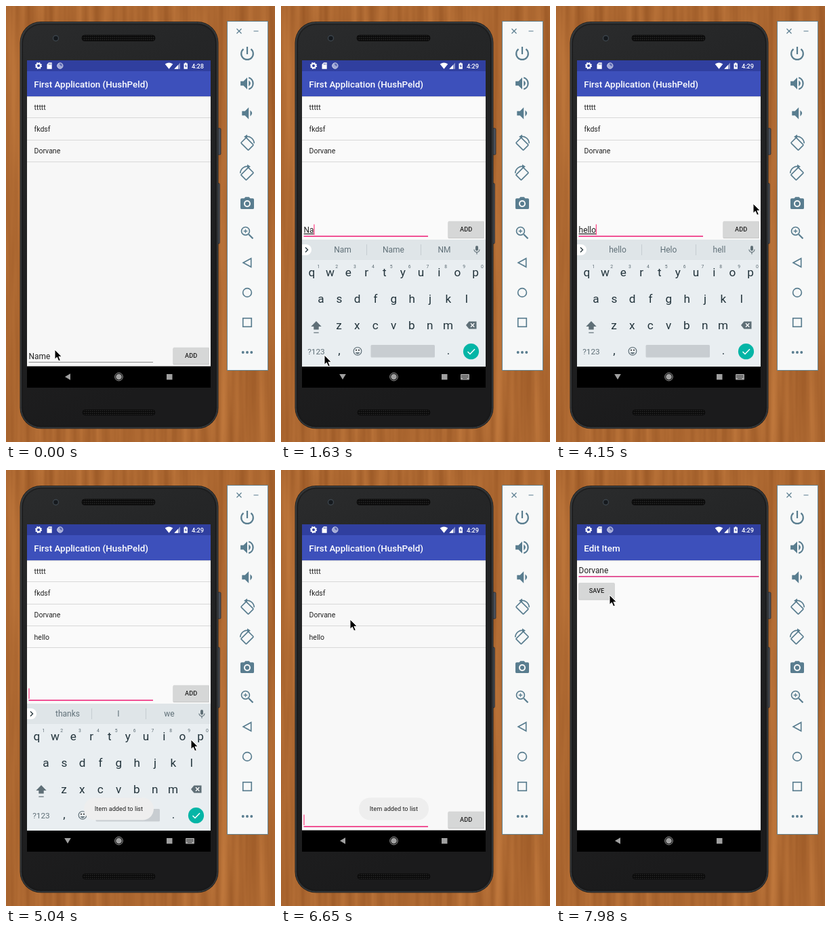
Write an HTML page that moves like this. It is 397 by 642 pixels and loops after 8 s.

```html
<!DOCTYPE html>
<html lang="en">
<head>
<meta charset="utf-8">
<title>List app demo</title>
<style>
  html, body { margin: 0; width: 100%; height: 100%; overflow: hidden; background: #ac6730; }
  svg { display: block; width: 397px; height: 642px; }
  text { font-family: Roboto, sans-serif; fill: #212121; white-space: pre; }
  .title { font-size: 13.4px; font-weight: 500; fill: #fff; }
  .item { font-size: 10.55px; }
  .field { font-size: 11.86px; }
  .label { font-size: 9.23px; font-weight: 500; text-anchor: middle; }
  .key { font-size: 17.2px; fill: #22333b; text-anchor: middle; }
  .hint { font-size: 6.8px; fill: #5c6b73; text-anchor: middle; }
  .word { font-size: 12px; fill: #607078; text-anchor: middle; }
  .line { fill: none; stroke: currentColor; stroke-width: 2; }
  .thin { stroke-width: 1.5; }
  .fine { stroke-width: 1.2; }
  .solid { fill: currentColor; }
</style>
</head>
<body>
<svg viewBox="0 0 397 642">
  <defs>
    <filter id="wood" x="0" y="0" width="1" height="1" color-interpolation-filters="sRGB">
      <feTurbulence type="fractalNoise" baseFrequency=".07 .003" numOctaves="3" seed="8"/>
      <feColorMatrix values=".2 0 0 0 .575  .17 0 0 0 .32  .12 0 0 0 .13  0 0 0 0 1"/>
    </filter>
    <linearGradient id="body" x2=".25" y2="1">
      <stop offset="0" stop-color="#2b2c2d"/><stop offset=".25" stop-color="#252627"/><stop offset="1" stop-color="#1b1b1c"/>
    </linearGradient>
    <linearGradient id="shade" x2="0" y2="1">
      <stop stop-opacity=".14"/><stop offset="1" stop-opacity="0"/>
    </linearGradient>
    <pattern id="mesh" width="3" height="3" patternUnits="userSpaceOnUse">
      <rect width="3" height="3" fill="#0b0b0b"/><circle cx="1.5" cy="1.5" r=".8" fill="#2c2c2c"/>
    </pattern>
    <clipPath id="screen"><rect x="31" y="80" width="271" height="482"/></clipPath>
  </defs>

  <rect width="397" height="642" filter="url(#wood)"/>

  <!-- phone -->
  <g fill="#4a505a" stroke="#25282c" stroke-width=".7">
    <rect x="311" y="180" width="6" height="39" rx="1.5"/>
    <rect x="311" y="261" width="4.4" height="89" rx="1.5"/>
  </g>
  <rect x="20.5" y="23" width="293" height="599.5" rx="31" fill="#1c1e1f"/>
  <rect x="22" y="24.5" width="290" height="596.5" rx="29.5" fill="url(#body)" stroke="#44494c"/>
  <rect x="24.5" y="27" width="285" height="591.5" rx="27.5" fill="none" stroke="#171819"/>
  <rect x="112" y="43" width="108" height="8.5" rx="4" fill="url(#mesh)" stroke="#0c0c0c"/>
  <rect x="113" y="594.5" width="107" height="8" rx="4" fill="url(#mesh)" stroke="#0c0c0c"/>
  <circle cx="73.5" cy="47.5" r="4" fill="#15191d" stroke="#3b434a" stroke-width="1.5"/>

  <g clip-path="url(#screen)">
    <g id="listPage">
      <rect id="page" x="31" y="80" width="271" height="451"/>
      <rect id="pressed" x="31" y="197.5" width="271" height="32" fill="#dedede"/>
      <g id="rows"></g>
      <g id="entry">
        <text id="typed" class="field" x="33.6" y="520"></text>
        <rect id="rule" x="33.5" width="183.5"/>
        <rect id="caret" y="507.5" width="1.2" height="15.5" fill="#ff4081"/>
        <g id="add"></g>
      </g>
    </g>
    <g id="editPage">
      <rect x="31" y="80" width="271" height="451" fill="#fafafa"/>
      <text class="field" x="33.6" y="152">Dorvane</text>
      <rect x="33.5" y="156" width="266" height="1.7" fill="#e0408a"/>
      <rect id="editCaret" x="33.4" y="139.5" width="1.2" height="15.5" fill="#ff4081"/>
      <g id="save"></g>
    </g>

    <!-- status bar -->
    <g fill="#fff">
      <circle cx="48" cy="88" r="3.1" fill="none" stroke="#fff" stroke-width="2.2"/>
      <circle cx="48" cy="88" r="4.4" fill="none" stroke="#fff" stroke-width="1.3" stroke-dasharray="1.9 1.56"/>
      <path d="M60.5 86l2.5-2.7h4.7v9.4h-7.2z"/>
      <path d="M63.2 84.6v2M64.7 84.6v2M66.2 84.6v2" stroke="#303f9f" stroke-width=".7"/>
      <circle cx="79.8" cy="88" r="4.2" fill="#a3aad6" stroke="#c4c9e6"/>
      <path d="M79 84.5a3.5 3.5 0 0 1 4 4a4 4 0 0 1-4-4" fill="#5c69b5"/>
      <path d="M234.7 85.6q5.8-4.4 11.6 0l-5.8 7.2z"/>
      <path d="M257 83.6v9.2h-8.7z" opacity=".45"/>
      <path d="M254 86.8v6h-5.7z"/>
      <path d="M262.5 84.4h1.5v-1h2.4v1h1.5v8.4h-5.4z"/>
      <path d="M265.5 85.6l-1.6 3.2h1.2v2.5l1.6-3.3h-1.2z" fill="#303f9f"/>
    </g>
    <text id="clock" class="label" x="283" y="91.6" style="fill:#fff"></text>

    <rect x="31" y="530.5" width="271" height="32"/>
    <g id="keyboard">
      <rect x="31" y="344" width="271" height="187" fill="#e9eef1"/>
      <rect x="31" y="344" width="271" height="30" fill="#dfe5e8"/>
      <path d="M31 351h6a8 8 0 0 1 0 16h-6z" fill="#fff"/>
      <path d="M36 355.5l3.5 3.5l-3.5 3.5" fill="none" stroke="#26363d" stroke-width="1.4"/>
      <path d="M126.5 351v16M206.5 351v16" stroke="#c6cdd1"/>
      <g id="words"></g>
      <g id="keys"></g>
      <g color="#5f6f77">
        <rect x="287" y="353" width="4" height="7.5" rx="2" class="solid"/>
        <path d="M285 358.5a4 4 0 0 0 8 0M289 362.5v3" class="line fine"/>
        <path d="M52 464l7.7 8h-4v4.5h-7.4v-4.5h-4z" class="solid"/>
        <path d="M48.3 481h7.4" class="line fine"/>
        <path d="M273 470l4.5-5.5h11v11h-11z" class="solid"/>
        <path d="M280 467.3l5.3 5.4m0-5.4l-5.3 5.4" stroke="#fff" stroke-width="1.3"/>
        <circle cx="113" cy="508.3" r="5.8" class="line fine"/>
        <path d="M109.8 510h6.4a3.3 3.3 0 0 1-6.4 0" class="solid"/>
        <circle cx="111" cy="506.7" r=".9"/><circle cx="115" cy="506.7" r=".9"/>
      </g>
      <text x="52" y="512.6" class="word" style="font-size:11.8px">?123</text>
      <rect x="132.5" y="499" width="94.5" height="18.5" rx="1.5" fill="#c8cdd1"/>
      <circle id="enter" cx="280.5" cy="508.7" r="11.6"/>
      <path d="M275.5 509l3.5 3.5l7-7.3" fill="none" stroke="#fff" stroke-width="1.5"/>
    </g>

    <!-- navigation -->
    <g fill="#a0a0a0">
      <path id="back" d="M87 546l8-4.8v9.6z"/>
      <circle cx="166.5" cy="546" r="4.3"/>
      <circle cx="166.5" cy="546" r="5.8" fill="none" stroke="#a0a0a0"/>
      <rect x="237" y="542" width="8.5" height="8.3"/>
      <g id="switcher">
        <rect x="265" y="542" width="13" height="8.5" rx="1"/>
        <path d="M266.5 544.3h10M266.5 546.4h10M268.5 548.6h6" stroke="#000" stroke-dasharray="1.2 .9"/>
      </g>
    </g>
    <g id="toast">
      <rect x="115" y="482.5" width="103" height="33" rx="16.5" fill="#eee"/>
      <text x="166.5" y="502" class="label" style="font-weight:400">Item added to list</text>
    </g>
  </g>

  <!-- emulator toolbar -->
  <rect x="326.5" y="22.5" width="60" height="514" fill="#f7f8f8" stroke="#64838f"/>
  <g id="tools" color="#597d8f">
    <path d="M340.5 33.5l7 7m0-7l-7 7M365.5 37h7" class="line fine"/>
  </g>

  <path id="cursor" d="M0 0v14.2l3.3-3l2.4 5.6l2.6-1.1l-2.4-5.4h4.4z" stroke="#fff" stroke-width="1"/>
</svg>

<script>
const LOOP = 8000;
const $ = id => document.getElementById(id);
const put = (id, markup) => $(id).insertAdjacentHTML('beforeend', markup);
const show = (id, on) => $(id).setAttribute('opacity', +on);
const shift = (id, x, y) => $(id).setAttribute('transform', `translate(${x} ${y})`);

// Each table row is [start time, values...]; a row holds until the next one.
const CLOCK = [[0, '4:28'], [890, '4:29']];
const TYPED = [[0, 'Name'], [1480, 'Nam'], [1630, 'Na'], [1775, 'N'], [1920, ''],
  [2220, 'h'], [2370, 'he'], [2510, 'hell'], [2810, 'hello'], [4885, '']];
const CARET = [[0, 0], [450, 1], [3260, 0], [3710, 1], [4300, 0], [4750, 1],
  [5330, 0], [5780, 1], [6220, 0], [6650, 1]];
const KEYBOARD = [[0, 0, 0], [600, .35, 24], [740, .8, 8], [890, 1, 0], [5780, .22, 30], [5925, 0, 0]];
const TOAST = [[0, 0], [4885, .5], [5035, 1], [6945, .5], [7095, 0]];
const EDIT = [[0, 0, 0], [6945, .5, 18], [7095, 1, 3], [7245, 1, 0]];
const CURSOR = [[0, 72, 506], [1040, 69, 509], [1180, 64, 514], [3860, 110, 468], [4000, 236, 340],
  [4150, 291, 291], [4600, 284, 311], [4750, 272, 326], [4885, 272, 340], [5035, 273, 397],
  [5190, 277, 455], [5330, 281, 504], [5925, 262, 462], [6070, 190, 320], [6215, 112, 182],
  [6360, 102, 220], [7400, 131, 278], [7690, 122, 262], [7840, 92, 206], [7975, 79, 184]];
const WORDS = {
  Name: 'Name Names Named', Nam: 'Nam Name Names', Na: 'Nam Name NM', N: 'N No Not',
  '': 'thanks I we', h: 'h hi hey', he: 'he hey her', hell: 'hell hello Hell', hello: 'hello Helo hell'
};
const PAGE = [[0, '#f7f7f7'], [890, '#fafafa'], [5780, '#f8f8f8']];

const at = (table, t) => table.findLast(row => row[0] <= t).slice(1);
const within = (t, from, to) => t >= from && t < to;

const header = title => `<rect x="31" y="133" width="271" height="2" fill="url(#shade)"/>
  <rect x="31" y="80" width="271" height="16.5" fill="#303f9f"/>
  <rect x="31" y="96" width="271" height="37" fill="#3d50bb"/>
  <text class="title" x="41.3" y="119.5">${title}</text>`;
const button = (x, y, label) => `<rect x="${x}" y="${y + 1}" width="53.5" height="24.6" rx="1.5" opacity=".2"/>
  <rect class="face" x="${x}" y="${y}" width="53.5" height="24.4" rx="1.5" fill="#d6d7d7"/>
  <text class="label" x="${x + 26.7}" y="${y + 15.2}">${label}</text>`;

function build() {
  put('rows', header('First Application (HushPeld)'));
  ['ttttt', 'fkdsf', 'Dorvane', 'hello'].forEach((name, i) => {
    const y = 152.8 + i * 32.3;
    put('rows', `<g ${i === 3 ? 'id="newRow"' : ''}><text class="item" x="41.5" y="${y}">${name}</text>
      <rect x="31" y="${Math.round(y + 11.6)}" width="271" height="1" fill="#d8d8d8"/></g>`);
  });
  put('editPage', header('Edit Item'));
  put('add', button(246.5, 502.7, 'ADD'));
  put('save', button(33.2, 166, 'SAVE'));

  [['qwertyuiop', 45.5, 398], ['asdfghjkl', 59, 437], ['zxcvbnm', 85.5, 476]].forEach(([row, x, y], r) =>
    [...row].forEach((c, i) => {
      const cx = x + i * 26.85;
      put('keys', `<text class="key" x="${cx}" y="${y}">${c}</text>`);
      if (!r) put('keys', `<text class="hint" x="${cx + 9.8}" y="385.5">${(i + 1) % 10}</text>`);
    }));
  put('keys', '<text class="key" x="86" y="513">,</text><text class="key" x="247" y="513">.</text>');
  [91, 166, 241].forEach(x => put('words', `<text class="word" x="${x}" y="363.3"></text>`));

  const line = (d, weight = '') => `<path class="line ${weight}" d="${d}"/>`;
  const solid = d => `<path class="solid" d="${d}"/>`;
  const rotate = `<rect class="line thin" x="7" y="6" width="10" height="14" rx="1" transform="rotate(-45 12 13)"/>
    ${line('M10 3.2a9.5 9.5 0 0 1 11.3 9', 'thin')}${solid('M12 .5v5.6l-4.5-2.8z')}`;
  const icons = [
    line('M12 3v10M7 5.9a8 8 0 1 0 10 0'),
    solid('M3 9v6h4l5 5V4L7 9zM14 8q5 4 0 8z') + line('M14 4.3a8 8 0 0 1 0 15.4'),
    solid('M5 9v6h4l5 5V4L9 9zM16 8q5 4 0 8z'),
    rotate,
    `<g transform="matrix(-1 0 0 1 24 0)">${rotate}</g>`,
    solid('M9.5 4L8 5.8H4.6a1.7 1.7 0 0 0-1.7 1.7v11a1.7 1.7 0 0 0 1.7 1.7h14.8a1.7 1.7 0 0 0 1.7-1.7v-11a1.7 1.7 0 0 0-1.7-1.7H16L14.5 4z') +
      '<circle cx="12" cy="13" r="4.6" fill="#f7f8f8"/><circle class="solid" cx="12" cy="13" r="2.8"/>',
    line('M14 14l5.7 5.7') + line('M9.7 7.2v5M7.2 9.7h5', 'fine') + '<circle class="line thin" cx="9.7" cy="9.7" r="5.4"/>',
    line('M17.2 6.3v11.4L6.6 12z', 'thin'),
    '<circle class="line thin" cx="12" cy="12" r="5.8"/>',
    '<rect class="line thin" x="6.3" y="6.3" width="11.4" height="11.4"/>',
    [6.3, 12, 17.7].map(x => `<circle class="solid" cx="${x}" cy="12" r="1.8"/>`).join('')
  ];
  icons.forEach((icon, i) => put('tools',
    `<g transform="translate(342.8 ${56.8 + i * 44}) scale(1.1)">${icon}</g>`));
}

function draw(t) {
  const [typed] = at(TYPED, t);
  const [alpha, drop] = at(KEYBOARD, t);
  const [editAlpha, editDrop] = at(EDIT, t);
  const open = within(t, 890, 5630);
  const focused = t >= 450;

  $('page').setAttribute('fill', at(PAGE, t)[0]);
  $('clock').textContent = at(CLOCK, t)[0];
  $('typed').textContent = typed;
  $('typed').style.textDecoration = focused ? 'underline' : 'none';
  $('rule').setAttribute('y', focused ? 524.2 : 524);
  $('rule').setAttribute('height', focused ? 1.8 : 1);
  $('rule').setAttribute('fill', focused ? '#f0418a' : '#8c8c8c');
  $('caret').setAttribute('x', 33.4 + (typed ? $('typed').getComputedTextLength() : 0));
  show('caret', at(CARET, t)[0]);
  shift('entry', 0, open ? -186 : 0);
  show('newRow', t >= 4885);
  show('pressed', within(t, 6800, 6945));
  $('add').querySelector('.face').setAttribute('fill', within(t, 4750, 5035) ? '#cbcccc' : '#d6d7d7');

  const words = WORDS[typed].split(' ');
  [...$('words').children].forEach((el, i) => { el.textContent = words[i]; });
  show('keyboard', alpha);
  shift('keyboard', 0, drop);
  $('enter').setAttribute('fill', within(t, 5480, 5780) ? '#079c90' : '#04b5a6');
  $('back').setAttribute('transform', within(t, 740, 5630) ? 'rotate(-90 91 546)' : '');
  show('switcher', open);

  show('toast', at(TOAST, t)[0]);
  show('editPage', editAlpha);
  shift('editPage', 0, editDrop);
  show('editCaret', within(t, 7245, 7690));
  shift('cursor', ...at(CURSOR, t));
}

build();
const start = performance.now();
function tick() {
  draw((performance.now() - start) % LOOP);
  requestAnimationFrame(tick);
}
tick();
</script>
</body>
</html>
```
